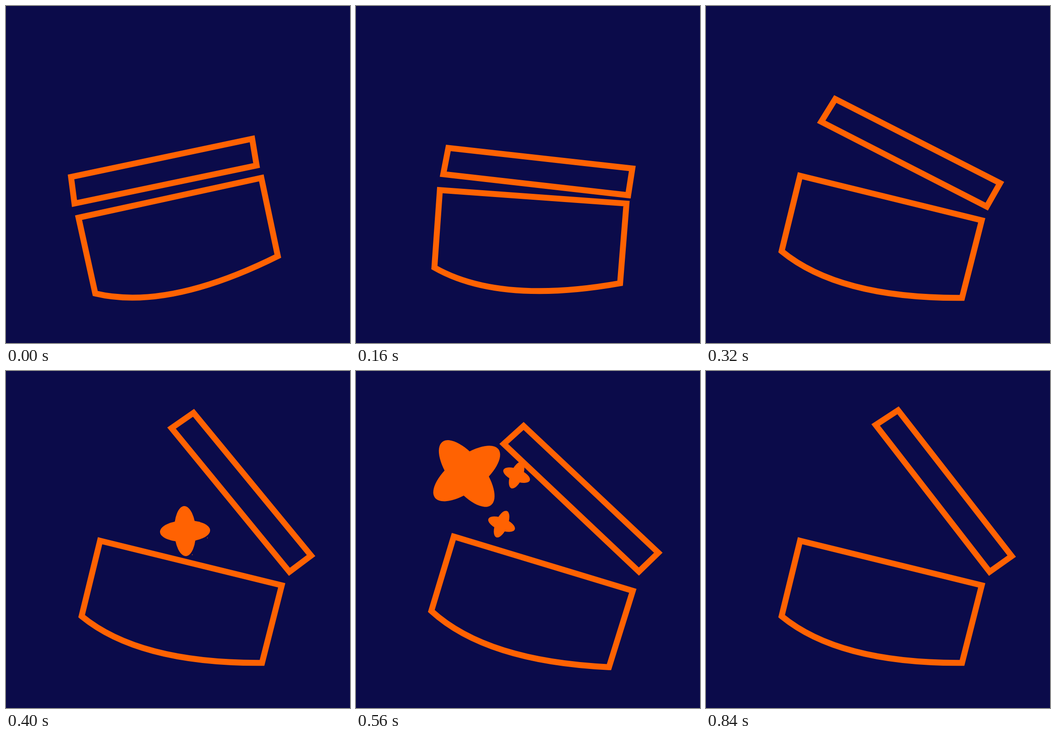
These frames come from a looping animation (755 px wide and 741 px high, 1000 ms). An HTML page with a canvas:

```html
<!DOCTYPE html>
<html lang="en">
<head>
<meta charset="utf-8">
<title>Opening box</title>
<style>
  html, body { margin: 0; height: 100%; overflow: hidden; background: #0b0b4a; }
  canvas { display: block; }
</style>
</head>
<body>
<canvas id="stage" width="755" height="741"></canvas>
<script>
const ctx = document.getElementById('stage').getContext('2d');
const PIVOT = [381.5, 521.1];
const BODY = new Path2D('M-205.3-101.8H205.3L204 74Q-57 140-205 69Z');
const LID = new Path2D('M0 0L2.5-59.4L-403.8-58.9L-408.4-.3Z');

const rad = deg => deg * Math.PI / 180;
const mix = (a, b, p) => a + (b - a) * p;
const progress = (t, from, to) => Math.min(1, Math.max(0, (t - from) / (to - from)));
const ease = (t, from, to) => (1 - Math.cos(Math.PI * progress(t, from, to))) / 2;
const fly = (start, speed, pull, u) => start + speed * u + pull * u * u;

function place(x, y, deg, draw) {
  ctx.save();
  ctx.translate(x, y);
  ctx.rotate(rad(deg));
  draw();
  ctx.restore();
}

function drawStar(x, y, r, angle) {
  if (r <= 0) return;
  place(x, y, angle, () => {
    for (const turn of [0, Math.PI / 2]) {
      ctx.beginPath();
      ctx.ellipse(0, 0, r, r * .43, turn, 0, 2 * Math.PI);
      ctx.fill();
    }
  });
}

function drawBigStar(u) {
  drawStar(fly(393, -174, -155, u), fly(352, -421, 349, u),
    fly(55, 175, -206, u), fly(-2, 103, -13, u));
}

// Grows and speeds up until u = 1, then slows down and shrinks away
function drawSmallStar(u, x, y, lift, pull) {
  if (u < 0) return;
  const s = Math.min(u, (u + 1.2) / 2.2);
  const r = (1 + 62.5 * Math.min(1, u) ** 1.3) * Math.min(1, 3 - 2 * u);
  drawStar(fly(x, -16, -246, s), fly(y, -lift, pull, s), r, 53 * u ** 1.57);
}

function drawBody(t, recoil) {
  const tilt = mix(-12.3, 13.82, ease(t, 20, 260)) + 5.85 * recoil;
  place(...PIVOT, tilt, () => ctx.stroke(BODY));
}

// Rocks around the body's pivot, then swings open on its lower right corner
function drawLid(t, recoil) {
  const rock = ease(t, -36, 262), open = ease(t, 250, 422);
  const tilt = mix(-12.8, 13.3, rock);
  const sin = Math.sin(rad(tilt)), cos = Math.cos(rad(tilt));
  const hx = 200 + 6.5 * rock ** 3;
  const hy = -132.8 + 1.6 * rock + 15 * rock * (1 - rock);
  const x = PIVOT[0] + hx * cos - hy * sin + 9.8 * open - 3 * recoil;
  const y = PIVOT[1] + hx * sin + hy * cos + .6 * open - recoil;
  place(x, y, tilt + 38.9 * open - 16.9 * recoil, () => ctx.stroke(LID));
}

function frame(now) {
  const t = Math.min(840, Math.floor(now % 1000 / 40) * 40);
  const recoil = Math.sin(Math.PI * progress(t, 430, 605)) ** 2;
  const u = (t - 400) / 280;
  ctx.clearRect(0, 0, 755, 741);
  ctx.strokeStyle = ctx.fillStyle = '#ff6202';
  ctx.lineWidth = 13;
  drawBody(t, recoil);
  drawLid(t, recoil);
  drawBigStar(u);
  drawSmallStar(u, 442, 367, 265, 41);
  drawSmallStar(u, 409, 404, 184, 116);
  requestAnimationFrame(frame);
}
requestAnimationFrame(frame);
</script>
</body>
</html>
```
